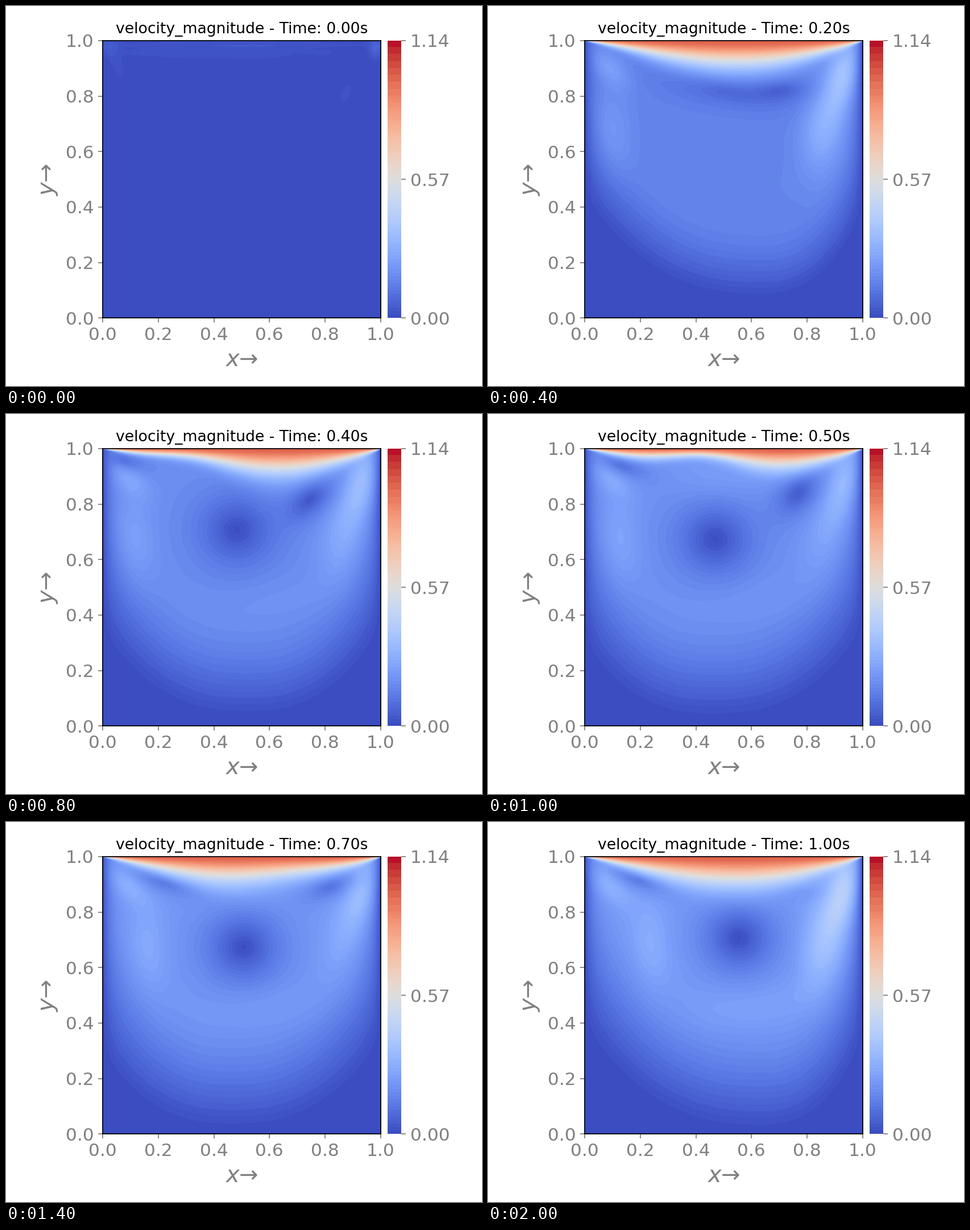
These frames come from a looping animation (837x669 px, 2.2 s). A matplotlib script:

```python
import numpy as np
import matplotlib.pyplot as plt
from matplotlib.animation import FuncAnimation

W, H, DPI = 837, 669, 160
VMAX, BANDS = 1.14, 80
FRAMES, N = 11, 489
GRAY = "gray"

c = (np.arange(N) + 0.5) / N
X, Y = np.meshgrid(c, c)


def bell(v, mid, width):
    return np.exp(-((v - mid) / width) ** 2)


def smooth(t, start, end):
    g = np.clip((t - start) / (end - start), 0, 1)
    return g * g * (3 - 2 * g)


def blob(x, y, w, h, tilt=0, power=1.0):
    """Tilted elliptic bump of height 1."""
    a = np.radians(tilt)
    dx, dy = X - x, Y - y
    u = (np.cos(a) * dx + np.sin(a) * dy) / w
    v = (np.cos(a) * dy - np.sin(a) * dx) / h
    return np.exp(-(u * u + v * v) ** power)


def swing(t):
    """Slow sideways sway of the whole flow."""
    return np.cos(2 * np.pi * (t - 0.15) / 0.9)


def lid(t):
    """Shear layer dragged by the lid, dented where the flow lifts it."""
    thick = 0.07 * (1 - np.exp(-t / 0.07))
    dent = 0.7 * bell(t, 0.5, 0.2) * bell(X, 1.35 * t - 0.26, 0.25)
    depth = 0.002 + thick * np.sin(np.pi * X ** 1.15) * (1 - dent)
    return np.exp(-((1 - Y) / (1.34 * depth)) ** 1.9)


def bulk(t):
    """Flow filling the box from the top, above a bowl-shaped floor."""
    level = 0.24 - 0.14 * np.exp(-t / 0.45)
    ramp = 0.52 - 0.45 * np.exp(-t / 0.3)
    mid = 0.54 + 0.1 * swing(t)
    off = np.where(X < mid, (mid - X) / mid, (X - mid) / (1 - mid)) ** 2.5
    rise = np.where(X < mid, 0.28 + 0.06 * swing(t), 0.28)
    floor = 0.17 * np.exp(-t / 0.2) + rise * off
    g = np.clip((Y - floor) / (ramp * (1 + 0.6 * off)), 0, 1)
    return level * np.sin(np.pi / 2 * g) ** 1.2


def jets(t):
    s = swing(t)
    return (0.09 * blob(0.08, 0.91, 0.10, 0.05, -45)
            + 0.055 * blob(0.09 + 0.15 * t * t, 0.68, 0.07, 0.16, 5)
            + (0.18 + 0.04 * s) * blob(0.94, 0.89, 0.06, 0.15, -16)
            + (0.085 + 0.05 * s) * blob(0.86, 0.69, 0.08, 0.17, -8)
            + 0.09 * bell(t, 0.6, 0.12) * blob(0.49, 0.90, 0.18, 0.10)
            + 0.03 * t * blob(0.60, 0.46, 0.22, 0.08, 5))


def eddies(t):
    """Factor that slows the flow around the three vortex cores."""
    grow = smooth(t, 0.15, 0.4)
    turn = bell(t, 0.5, 0.2)

    x = np.interp(t, (0.1, 0.6, 0.8), (0.52, 0.457, 0.555))
    y = np.interp(t, (0.1, 0.2, 0.4, 0.6, 0.8), (0.85, 0.82, 0.705, 0.64, 0.705))
    main = (0.55 + 0.4 * grow) * blob(
        x, y, 0.20 - 0.07 * grow, 0.045 + 0.08 * grow, -8, 0.75)

    x = np.interp(t, (0.1, 0.8, 1), (0.67, 0.84, 0.77))
    y = np.interp(t, (0.1, 0.3, 0.7, 1), (0.845, 0.79, 0.89, 0.87))
    right = 0.85 * bell(t, 0.4, 0.45) * blob(
        x, y, 0.09, 0.03 + 0.03 * turn, 50 * turn, 0.75)

    x = np.interp(t, (0.4, 0.8, 1), (0.08, 0.28, 0.20))
    left = 0.55 * grow * blob(x, 0.98 - 0.33 * x, 0.05 + 0.3 * x, 0.035, -18, 0.75)
    return (1 - main) * (1 - right) * (1 - left)


def traces():
    """Faint specks under the lid before the flow starts."""
    v = 0.03 * blob(0.025, 0.97, 0.035, 0.035) + 0.06 * blob(0.982, 0.968, 0.024, 0.036, -10)
    v += 0.02 * (blob(0.055, 0.905, 0.028, 0.06, 20) + blob(0.875, 0.808, 0.024, 0.056, -22))
    v += 0.018 * blob(0.5, 0.983, 0.9, 0.014)
    for x, w in ((0.13, 0.06), (0.27, 0.15), (0.55, 0.22), (0.78, 0.05)):
        v += 0.02 * blob(x, 0.955, w, 0.17 * w)
    return v


def speed(t):
    if t == 0:
        return traces()
    walls = (1 - np.exp(-X / 0.025)) * (1 - np.exp(-(1 - X) / 0.025))
    body = (bulk(t) + jets(t)) * walls * eddies(t)
    top = lid(t)
    return top + (1 - top) ** 1.5 * body


def banded(v):
    step = VMAX / BANDS
    return (np.floor(np.clip(v, 0, VMAX - 1e-6) / step) + 0.5) * step


def add_axes(x0, x1, y0=60.9, y1=549.4):
    return fig.add_axes([x0 / W, 1 - y1 / H, (x1 - x0) / W, (y1 - y0) / H])


plt.rcParams["font.family"] = "DejaVu Sans"
fig = plt.figure(figsize=(W / DPI, H / DPI), dpi=DPI, facecolor="white")
ax = add_axes(169.9, 658.9)
bar = add_axes(671, 695)

# Bar steps, twice as tall near the top
steps = np.arange(BANDS) + 0.5
steps[-16:] = steps[-16:].reshape(-1, 2).mean(axis=1).repeat(2)

style = dict(origin="lower", cmap="coolwarm", vmin=0, vmax=VMAX,
             aspect="auto", interpolation="nearest")
field = ax.imshow(np.zeros((N, N)), extent=(0, 1, 0, 1), **style)
bar.imshow(steps[:, None] * VMAX / BANDS, extent=(0, 1, 0, VMAX), **style)

ax.set_xticks(np.linspace(0, 1, 6))
ax.set_yticks(np.linspace(0, 1, 6))
title = ax.set_title("", fontsize=12)

bar.set_xticks([])
bar.yaxis.tick_right()
bar.set_yticks([0, VMAX / 2, VMAX], ["0.00", "0.57", "1.14"])
bar.spines[:].set_visible(False)
for a in (ax, bar):
    a.tick_params(colors=GRAY, labelsize=14)

label = dict(fontsize=18, color=GRAY, ha="center", va="baseline", rotation_mode="anchor")
fig.text(414 / W, 1 - 634 / H, "$x$→", **label)
fig.text(83.5 / W, 1 - 305.5 / H, "$y$→", rotation=90, **label)

fields = [banded(speed(i / 10)) for i in range(FRAMES)]


def draw(i):
    field.set_data(fields[i])
    title.set_text(f"velocity_magnitude - Time: {i / 10:.2f}s")
    return field, title


anim = FuncAnimation(fig, draw, frames=FRAMES, interval=200, repeat=True, repeat_delay=0)
plt.show()
```
